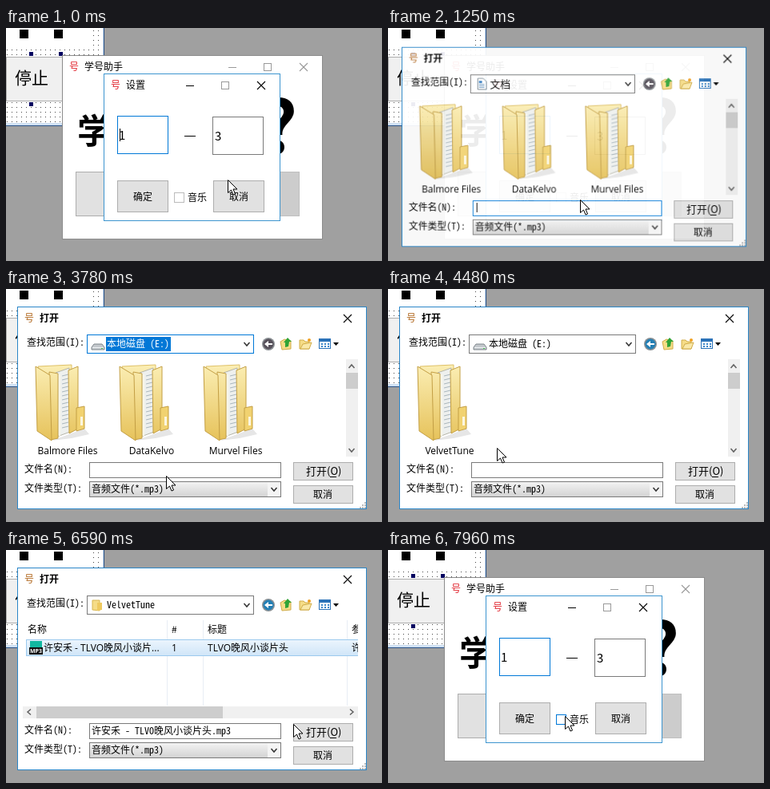
Recreate the animation shown at these times as an HTML page with a canvas. Size 470 by 292 pixels, loop 8 s.

```html
<!DOCTYPE html>
<html lang="zh-CN">
<head>
<meta charset="utf-8">
<style>
html, body { margin: 0; width: 100%; height: 100%; overflow: hidden; background: #a0a0a0; }
canvas { display: block; }
</style>
</head>
<body>
<canvas id="stage" width="470" height="292"></canvas>
<script>
const W = 470, H = 292, LOOP = 8000;
const stage = document.getElementById('stage').getContext('2d');
const layer = Object.assign(document.createElement('canvas'), { width: W, height: H });
const layerCtx = layer.getContext('2d');
const CJK = '"Noto Sans CJK SC", "Noto Sans CJK", sans-serif';
const LATIN = '"Open Sans", ' + CJK;
const MONO = '"Noto Sans Mono CJK SC", "Noto Sans CJK SC", monospace';
const BLUE = '#0078d7', GREY = '#7a7a7a';
const OPEN_AT = 1150, CLOSE_AT = 7190, FADE = 240;
const CLICKS = [780, 2240, 3630, 4880, 5040, 5720, CLOSE_AT];
const SONG = '许安禾 - TLVO晚风小谈片', TITLE = 'TLVO晚风小谈片头';
// time, x, y
const PATH = [
  [0, 277, 190], [70, 277, 190], [350, 245, 224], [610, 217, 213], [850, 217, 213],
  [1230, 240, 215], [1640, 240, 215], [2000, 327, 73], [2090, 325, 71], [2260, 299, 75],
  [2500, 299, 75], [3000, 200, 165], [3050, 200, 165], [3480, 200, 234], [3980, 200, 234],
  [4800, 104, 182], [5180, 104, 182], [5650, 100, 122], [5980, 100, 122],
  [6590, 359, 218], [6810, 372, 226], [7260, 372, 226], [7850, 221, 208], [8000, 221, 208]
];
const PLACES = [
  ['快速访问', 0, '#3f8fd6'], ['桌面', 0, '#2f7fc4'], ['库', 1, '#4a90c8'], ['文档', 2, 'doc'],
  ['MartinLow482', 1, '#c9ad58'], ['家庭组', 1, '#3c9ccb'], ['计算机', 1, '#3d7fae'],
  ['本地磁盘 (C:)', 2, 'drive'], ['本地磁盘 (D:)', 2, 'drive'],
  ['本地磁盘 (E:)', 2, 'drive'], ['DVD RW 驱动器 (Z:)', 2, 'drive']
];
let c = stage, mouse = [0, 0];

const clamp = v => Math.max(0, Math.min(1, v));

function mouseAt(t) {
  const i = Math.max(1, PATH.findIndex(p => p[0] >= t));
  const [t0, x0, y0] = PATH[i - 1], [t1, x1, y1] = PATH[i];
  const p = clamp((t - t0) / (t1 - t0)), e = p * p * (3 - 2 * p);
  return [x0 + (x1 - x0) * e, y0 + (y1 - y0) * e];
}

function box(x, y, w, h, fill, stroke) {
  c.fillStyle = fill;
  c.fillRect(x, y, w, h);
  if (stroke) {
    c.strokeStyle = stroke;
    c.lineWidth = 1;
    c.strokeRect(x + .5, y + .5, w - 1, h - 1);
  }
}

function poly(pts, fill, stroke, dx = 0, dy = 0) {
  c.beginPath();
  for (let i = 0; i < pts.length; i += 2) c.lineTo(pts[i] + dx, pts[i + 1] + dy);
  c.closePath();
  c.fillStyle = fill;
  c.fill();
  if (stroke) { c.strokeStyle = stroke; c.lineWidth = 1; c.stroke(); }
}

function line(color, width, ...pts) {
  c.beginPath();
  for (let i = 0; i < pts.length; i += 2) c.lineTo(pts[i], pts[i + 1]);
  c.strokeStyle = color;
  c.lineWidth = width;
  c.stroke();
}

function disc(x, y, r, fill) {
  c.beginPath();
  c.arc(x, y, r, 0, 7);
  c.fillStyle = fill;
  c.fill();
}

function text(s, x, y, size = 12, color = '#000', family = CJK, weight = 400) {
  c.font = `${weight} ${size}px ${family}`;
  c.fillStyle = color;
  c.fillText(s, x, y);
  return c.measureText(s).width;
}

const mono = (s, x, y, color) => text(s, x, y, 12, color, MONO);

function gradient(y0, y1, from, to) {
  const g = c.createLinearGradient(0, y0, 0, y1);
  g.addColorStop(0, from);
  g.addColorStop(1, to);
  return g;
}

const inside = (x, y, w, h) =>
  mouse[0] > x + 1 && mouse[0] < x + w && mouse[1] > y + 1 && mouse[1] < y + h;

function button(x, y, w, h, live) {
  const hot = live && inside(x, y, w, h);
  box(x, y, w, h, hot ? '#e5f1fb' : '#e1e1e1', hot ? BLUE : '#adadad');
}

function cross(x, y, color) {
  line(color, 1.1, x, y, x + 10, y + 10);
  line(color, 1.1, x + 10, y, x, y + 10);
}

function titleButtons(x, y, color, maxColor) {
  box(x, y + 5, 10, 1, color);
  c.strokeStyle = maxColor;
  c.lineWidth = 1;
  c.strokeRect(x + 44.5, y + .5, 9, 9);
  cross(x + 89, y, color);
}

// (dx, dy) is the unit direction of the tip.
function chevron(x, y, dx, dy, color = '#333') {
  const bx = x - 2 * dx, by = y - 2 * dy;
  line(color, 1.5, bx - 3.5 * dy, by - 3.5 * dx, x + 2 * dx, y + 2 * dy, bx + 3.5 * dy, by + 3.5 * dx);
}

function desktop() {
  box(0, 0, W, H, '#a0a0a0');
  box(0, 0, 123, 123, '#2b5288');
  box(0, 0, 122, 122, '#cfe0f2');
  box(0, 0, 121, 119, '#fff');
  c.fillStyle = '#444';
  for (let y = 3; y < 119; y += 6)
    for (let x = 1; x < 121; x += 6) c.fillRect(x, y, 1, 1);
  box(0, 0, 108, 24, '#fff');
  box(0, 36, 108, 56, '#f0f0f0', '#adadad');
  text('停止', 11, 70, 21);
  for (const x of [17, 60]) box(x, 2, 11, 11, '#000');
  for (const [x, y] of [[29, 30], [66, 30], [29, 93]]) box(x, y, 5, 5, '#000060');
}

function mainWindow() {
  box(70, 34, 326, 231, '#fff', '#8c8c8c');
  text('号', 79, 53, 12, '#e0202a', CJK, 500);
  text('学号助手', 98, 53, 12, '#000', CJK, 500);
  titleButtons(278, 44, '#999', '#999');
  text('学', 89, 145, 43, '#000', CJK, 700);
  text('?', 318, 157, 90, '#000', CJK, 700);
  box(87, 180, 120, 56, '#e1e1e1', '#adadad');
  box(247, 180, 120, 56, '#ccc', '#bfbfbf');
}

function settings(t) {
  const live = t < OPEN_AT || t > CLOSE_AT + FADE;
  box(122, 57, 221, 185, '#fff', '#3d95cf');
  text('号', 131, 76, 12, '#e0202a', CJK, 500);
  text('设置', 150, 76, 12, '#000', CJK, 500);
  titleButtons(225, 67, '#000', '#999');
  box(139, 110, 64, 48, '#fff', BLUE);
  box(258, 111, 64, 48, '#fff', GREY);
  text('1', 141, 140, 15);
  text('3', 261, 141, 15);
  box(223, 135, 14, 1, '#000');
  if (t < 530) box(142, 126, 1, 16, '#000');
  button(139, 191, 64, 40, live);
  text('确定', 159, 216);
  button(259, 191, 64, 40, live);
  text('取消', 279, 216);
  box(210, 206, 13, 13, '#fff', live && inside(208, 203, 44, 19) ? BLUE : '#bbb');
  text('音乐', 227, 217);
}

function smallIcon(kind, x, y) {
  if (kind === 'doc') {
    poly([2, 0, 9, 0, 13, 4, 13, 14, 2, 14], '#fff', '#7d8b96', x + .5, y);
    box(x + 4, y + 3, 4, 3, '#3f83c4');
    for (const dy of [7, 9, 11]) box(x + 4, y + dy, 7, 1, '#7aa2c6');
  } else if (kind === 'drive') {
    poly([3, 5, 13, 5, 16, 9, 16, 12, 0, 12, 0, 9], '#c3c8cc', '#7f868c', x, y);
    box(x + 1, y + 9, 14, 1, '#eef1f3');
    box(x + 12, y + 10, 2, 1, '#3ec04a');
  } else if (kind === 'folder') {
    poly([1, 1, 10, 1, 10, 14, 1, 13], '#f5dc87', '#d9b650', x, y);
    poly([7, 4, 13, 4, 13, 13, 7, 14], '#eec95f', null, x, y);
  } else {
    poly([2, 3, 9, 1, 14, 4, 14, 11, 7, 14, 2, 10], kind, null, x, y);
    box(x + 4, y + 5, 5, 4, '#ffffff90');
  }
}

function folder(x, y, name) {
  const pale = gradient(y, y + 95, '#fbeeb4', '#e6c25a'), seam = '#c39f45';
  poly([61, 80, 67, 87, 45, 92, 20, 95], '#e6e6e6', null, x, y);
  poly([3, 2, 45, 0, 46, 78, 18, 92], pale, '#dfc168', x, y);
  poly([25, 10, 42, 4, 43, 84, 27, 90], '#eef0ee', '#b5b5a8', x, y);
  for (let i = 0; i < 14; i++) line('#a9b6bd', 1, x + 33, y + 14 + i * 5, x + 41, y + 12 + i * 5);
  poly([41, 7, 53, 2, 53, 80, 42, 86], pale, seam, x, y);
  poly([51, 54, 61, 52, 61, 80, 51, 83], '#f1d270', seam, x, y);
  box(x + 56, y + 65, 3, 11, '#fbf6e0');
  poly([17, 9, 28, 11, 28, 92, 19, 94], pale, seam, x, y);
  line('#f8f6ea', 2, x + 30, y + 12, x + 30, y + 89);
  poly([0, 2, 18, 13, 20, 95, 2, 83], pale, seam, x, y);
  c.textAlign = 'center';
  text(name, x + 40, y + 112, 12, '#000', LATIN);
  c.textAlign = 'left';
}

function folders(names) {
  names.forEach((name, i) => folder(37 + i * 105, 95, name));
  box(425, 88, 15, 122, '#f0f0f0');
  box(425, 105, 15, 20, '#cdcdcd');
  chevron(432, 97, 0, -1, '#606060');
  chevron(432, 202, 0, 1, '#606060');
}

function songs(t) {
  const selected = t >= 5720, loaded = t >= 5300;
  for (const x of [201, 246, 426]) box(x, 88, 1, 107, '#e8eef4');
  c.save();
  c.beginPath();
  c.rect(21, 88, 419, 122);
  c.clip();
  text('名称', 27, 104);
  text('#', 207, 104);
  text('标题', 252, 104);
  text('参', 432, 104);
  if (selected) box(25, 112, 417, 21, gradient(112, 133, '#ecf5fd', '#cfe5f8'), '#9bc9ee');
  else if (inside(25, 111, 415, 21)) box(25, 112, 417, 21, '#eef6fd', '#cfe5f8');
  box(30, 114, 15, 15, '#12b8a0');
  box(29, 122, 17, 9, '#111');
  text('MP3', 30, 129, 7, '#fff', LATIN, 700);
  text(SONG + '...', 47, 127, 12, '#000', LATIN);
  if (loaded) {
    text('1', 207, 127, 12, '#000', LATIN);
    text(TITLE, 252, 127, 12, '#000', LATIN);
    text('许', 432, 127);
  }
  c.restore();
  box(21, 196, 419, 15, '#f0f0f0');
  box(38, 196, 233, 15, loaded ? '#cdcdcd' : '#dadada');
  box(38, 196, 224, 15, '#cdcdcd');
  chevron(29, 203, -1, 0, '#606060');
  chevron(432, 203, 1, 0, '#606060');
}

function toolbar(canGoBack) {
  disc(328, 69, 8, '#8b9094');
  disc(328, 69, 6.5, canGoBack ? '#237fb5' : '#56505a');
  poly([323, 69, 328, 65, 328, 68, 333, 68, 333, 70, 328, 70, 328, 73], '#fff');
  poly([343, 66, 348, 63, 356, 65, 356, 75, 345, 76], '#f5dc87', '#d0ac48');
  poly([349, 73, 349, 67, 347, 67, 352, 61, 357, 66, 354, 66, 353, 72], '#2fa336');
  poly([367, 64, 372, 64, 374, 66, 379, 66, 379, 75, 367, 75], '#f5dc87', '#d0ac48');
  poly([371, 69, 382, 67, 379, 75, 368, 75], '#f9e8a8', '#d0ac48');
  disc(379, 64, 2, '#f0a020');
  box(391, 62, 15, 13, '#fff', '#2a72b8');
  box(391, 62, 15, 4, '#2a72b8');
  for (const x of [394, 398, 402]) for (const y of [68, 71]) box(x, y, 2, 2, '#3c86c8');
  poly([409, 67, 416, 67, 412.5, 71], '#000');
}

function placeCombo(t) {
  const focused = t >= 2240 && t < 4010, listOpen = t >= 2240 && t < 3630;
  box(101, 57, 209, 24, '#fff', focused ? BLUE : GREY);
  if (listOpen || (t < 3630 && inside(101, 57, 209, 24))) box(293, 57, 17, 24, '#cce4f7', BLUE);
  chevron(301, 69, 0, 1);
  if (t < 3630) {
    smallIcon('doc', 108, 62);
    text('文档', 126, 74, 13);
  } else if (t < 5000) {
    smallIcon('drive', 107, 64);
    if (focused) box(125, 60, 81, 18, BLUE);
    mono('本地磁盘 (E:)', 126, 73, focused ? '#fff' : '#000');
  } else {
    smallIcon('folder', 107, 62);
    mono('VelvetTune', 126, 73);
  }
}

function placeList(t) {
  const top = 81, full = 177, h = Math.round(full * clamp((t - 2337) / 200));
  if (!h || t >= 3630) return;
  box(104, top + 3, 208, h, '#00000030');
  box(101, top, 209, h, '#fff', '#444');
  c.save();
  c.beginPath();
  c.rect(102, top + 1, 207, h - 2);
  c.clip();
  const hot = mouse[1] < top ? 3 : Math.min(10, Math.round((mouse[1] - top - 7) / 16));
  PLACES.forEach(([name, level, kind], i) => {
    const x = 125 + level * 10 + (level > 1), y = top + h - 10 - 16 * (10 - i);
    smallIcon(kind, x - 20, y - 7);
    if (i === hot) {
      c.globalAlpha = .4;
      box(x - 20, y - 7, 15, 15, BLUE);
      c.globalAlpha = 1;
      const latin = name.replace(/[^\x00-\xff]/g, '').length;
      box(x - 2, y - 8, (name.length * 2 - latin) * 6 + 4, 16, BLUE);
    }
    mono(name, x, y + 4, i === hot ? '#fff' : '#000');
  });
  c.restore();
}

function openDialog(t) {
  box(14, 22, 437, 254, '#fff', '#2a86c8');
  text('号', 23, 41, 12, '#b0661c', CJK, 500);
  text('打开', 42, 41, 12, '#000', CJK, 700);
  cross(422, 32, '#000');
  mono('查找范围(I):', 26, 71);
  toolbar(t >= 4010);
  if (t < 4010) folders(['Balmore Files', 'DataKelvo', 'Murvel Files']);
  else if (t < 5000) {
    if (t >= 4880) box(25, 90, 104, 120, '#cce8ff');
    else if (inside(25, 90, 104, 120)) box(25, 90, 104, 120, '#e5f3ff');
    folders(['VelvetTune']);
  } else songs(t);

  mono('文件名(N):', 23, 230);
  box(104, 217, 240, 20, '#fff', t < 2240 ? BLUE : GREY);
  if (t < 1480 || (t > 2010 && t < 2240)) box(109, 220, 1, 12, '#000');
  if (t >= 5720) mono(SONG + '头.mp3', 107, 231);
  mono('文件类型(T):', 23, 254);
  box(104, 241, 240, 20, gradient(241, 261, '#f4f4f4', '#d2d2d2'), GREY);
  box(327, 242, 16, 18, '#f4f4f4');
  mono('音频文件(*.mp3)', 107, 255);
  chevron(335, 251, 0, 1);
  button(359, 217, 75, 23, true);
  text('打开(O)', 375, 233, 13);
  box(405, 235, 8, 1, '#000');
  button(359, 246, 75, 23, true);
  text('取消', 384, 262);
  for (let i = 0; i < 3; i++)
    for (let j = 0; j <= i; j++) box(448 - j * 3, 267 + i * 3, 2, 2, '#bbb');
  placeCombo(t);
  placeList(t);
}

function pointer(t) {
  const [x, y] = mouse.map(Math.round);
  if (CLICKS.some(k => t >= k && t < k + 110)) disc(x, y, 12, '#ffee30cc');
  poly([0, 0, 0, 16, 4, 12.5, 6.5, 18.5, 9, 17.5, 6.5, 11.5, 11.5, 11.5], '#fff', '#000', x + .5, y + .5);
}

function draw(t) {
  mouse = mouseAt(t);
  c = stage;
  desktop();
  mainWindow();
  settings(t);
  const rest = t < CLOSE_AT ? 1 - clamp((t - OPEN_AT) / FADE) : clamp((t - CLOSE_AT) / FADE);
  const away = rest ** 3;
  if (away < 1) {
    c = layerCtx;
    c.clearRect(0, 0, W, H);
    openDialog(t);
    c = stage;
    const scale = 1 - .07 * away;
    c.save();
    c.globalAlpha = 1 - away ** 1.6;
    c.translate(232.5 * (1 - scale), 149 * (1 - scale));
    c.scale(scale, scale);
    c.drawImage(layer, 0, 0);
    c.restore();
  }
  pointer(t);
}

const began = performance.now();
function tick() {
  draw((performance.now() - began) % LOOP);
  requestAnimationFrame(tick);
}
tick();
</script>
</body>
</html>
```
